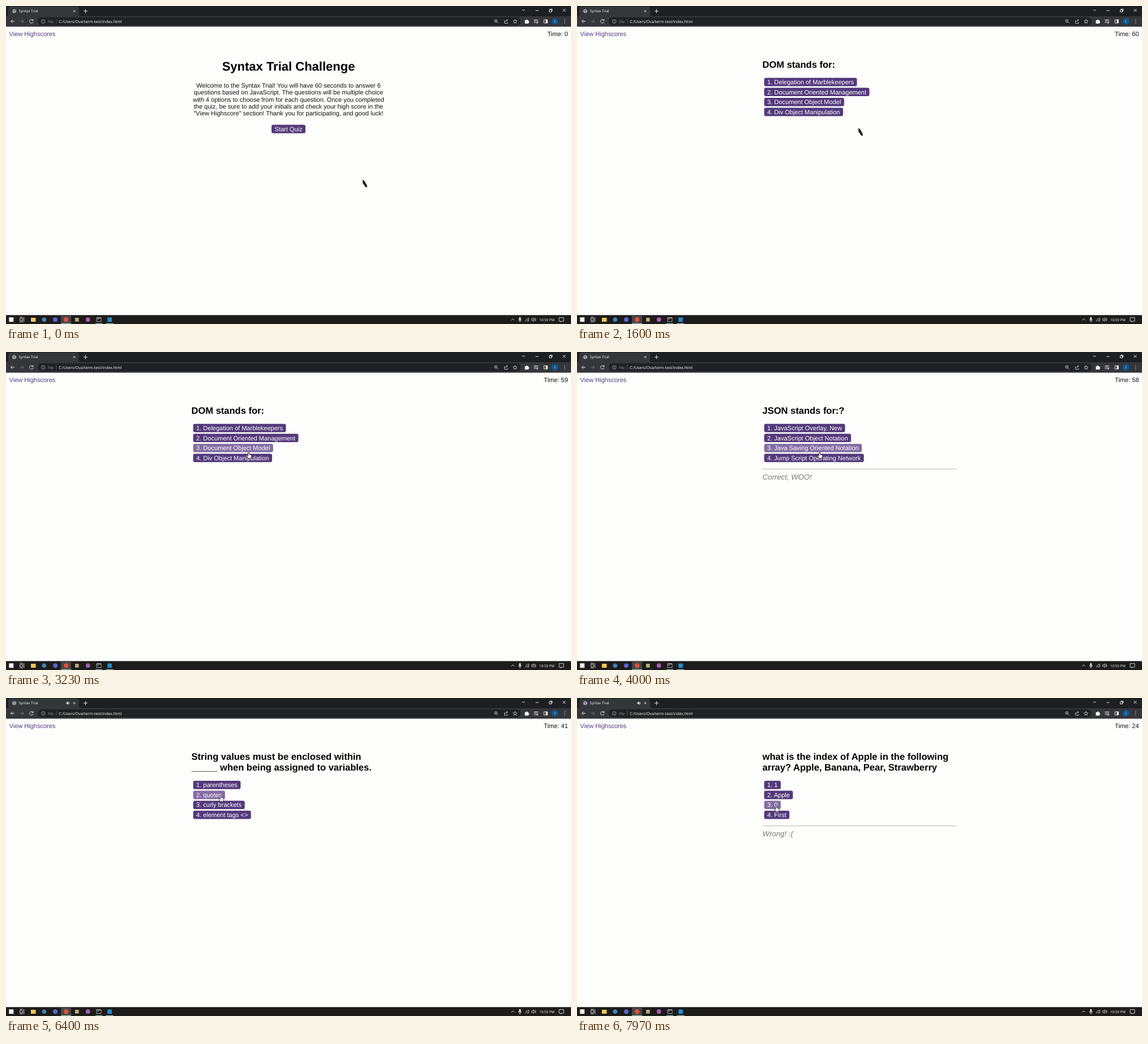
An HTML page for the animation above (8000 ms loop, 998 by 561 pixels).

```html
<!DOCTYPE html>
<html lang="en">
<head>
<meta charset="utf-8">
<title>Syntax Trial</title>
<style>
  html, body { margin: 0; width: 100%; height: 100%; overflow: hidden; background: #fdfdfc; }
  svg { display: block; width: 100%; height: 100%; }
  text { font-family: "Liberation Sans", Arial, sans-serif; font-size: 11px; fill: #111; text-rendering: geometricPrecision; white-space: pre; }
  .ui text { font-family: "Open Sans", "Noto Sans", sans-serif; font-size: 6.4px; fill: #fff; }
  .line { fill: none; stroke: #e0e2e5; stroke-width: 1; }
  .h1 { font-size: 22px; font-weight: bold; fill: #000; }
  .h2 { font-size: 16.5px; font-weight: bold; fill: #000; }
  .note { font-size: 13.2px; font-style: italic; fill: #777; }
  .mid { text-anchor: middle; }
  .end { text-anchor: end; }
  .btn rect { fill: #533a7b; }
  .btn.over rect { fill: #846da4; }
  .btn text { fill: #fff; }
</style>
</head>
<body>
<svg viewBox="0 0 998 561" preserveAspectRatio="none">
  <rect width="998" height="561" fill="#fdfdfc"/>

  <g class="ui">
    <rect width="998" height="18" fill="#1e1f22"/>
    <path d="M0 18Q4 18 4 14V5Q4 1 8 1H125Q129 1 129 5V14Q129 18 133 18Z" fill="#33373a"/>
    <rect y="18" width="998" height="18.5" fill="#35363a"/>
    <circle cx="14.6" cy="9" r="3.6" fill="#a5a9ad"/>
    <path d="M12 7.5l2.5 1 1 2-1 1.5M15 6l2 2" class="line" style="stroke:#4a4e52"/>
    <text x="22.5" y="11.2">Syntax Trial</text>
    <g id="sound">
      <path d="M106.5 7.8h1.6l2-1.8v6l-2-1.8h-1.6z" fill="#e8eaed"/>
      <path d="M111.2 7.2q1.5 1.8 0 3.6" class="line" stroke-width=".8"/>
    </g>
    <path d="M118.7 7.2l3.6 3.6m0-3.6l-3.6 3.6M137 9h7m-3.5-3.5v7" class="line"/>
    <path d="M911.8 6l2.4 2.4 2.4-2.4M935.5 8h5.2M959.7 6.7h3.8v3.8h-3.8zM961 6.5v-1.2h3.8v3.8h-1.2M983.5 5l5 5m0-5l-5 5" class="line" stroke-width=".8"/>

    <rect x="56" y="20" width="853" height="14" rx="7" fill="#202124"/>
    <path d="M15 27H8.5m3-3l-3 3 3 3" class="line"/>
    <path d="M24.5 27h6.5m-3-3l3 3-3 3" class="line" style="stroke:#77797c"/>
    <path d="M47.3 25A3.2 3.2 0 1 0 47.9 28M48 23.5v2.2h-2.5" class="line"/>
    <circle cx="65.7" cy="27.2" r="3.3" class="line" style="stroke:#aeb1b5;stroke-width:.8"/>
    <path d="M65.7 26.7v2.2m0-3.8v.8" class="line" style="stroke:#aeb1b5;stroke-width:.8"/>
    <text x="74" y="29.5" style="fill:#9aa0a6">File</text>
    <path d="M88.8 23v8" class="line" style="stroke:#5f6368;stroke-width:.8"/>
    <text x="93.3" y="29.5" style="font-size:6.9px">C:/Users/Ova/term-test/index.html</text>
    <g class="line" style="stroke:#c5c8cc;stroke-width:.9">
      <circle cx="865.2" cy="26.3" r="2.4"/>
      <path d="M867 28.2l2.3 2.3M864 26.3h2.4"/>
      <path d="M880.5 25.5v5h5.5v-2M881.8 28q.5-3 3.5-3m-1.2-1.8l2 1.8-2 1.8"/>
      <path d="M899.2 23.7l1 2.3 2.5.2-1.9 1.7.6 2.5-2.2-1.4-2.2 1.4.6-2.5-1.9-1.7 2.5-.2z"/>
    </g>
    <path d="M916.5 25h2.2a1.2 1.2 0 0 1 2.4 0h1.9v2a1.2 1.2 0 0 1 0 2.4v1.6h-6.5z" fill="#f1f3f4"/>
    <path d="M932.5 24.5h7.5M932.5 26.8h5M932.5 29.2h3.5M939 26v3.5" class="line"/>
    <circle cx="938.2" cy="29.5" r="1.2" fill="#f1f3f4"/>
    <path d="M950.2 24.2h6v5.8h-6z" class="line"/>
    <rect x="953.5" y="24" width="3" height="6" fill="#f1f3f4"/>
    <circle cx="969.6" cy="27" r="5.8" fill="#0b5c96"/>
    <text x="969.6" y="29.2" class="mid" style="font-size:6px">I</text>
    <path d="M986.8 23.3v1.4m0 1.6v1.4m0 1.6v1.4" class="line" stroke-width="1.4"/>

    <rect y="545.3" width="998" height="16" fill="#1d1c1a"/>
    <rect x="97" y="545.3" width="18" height="16" fill="#474644"/>
    <path d="M97 560.3h18M158 560.3h12M176.5 560.3h13" class="line" style="stroke:#86bfae;stroke-width:1.3"/>
    <rect x="5.3" y="549.2" width="8" height="8" fill="#f2f2f2"/>
    <path d="M24.5 551.3h5v3.8h-5zM24 549.2h6M24 557.2h6M31.7 549v8.5" class="line" style="stroke-width:.9"/>
    <rect x="44" y="550" width="8.5" height="7" fill="#f0c75a"/>
    <circle cx="67.3" cy="553.2" r="3.8" fill="#3d86bd"/>
    <circle cx="87" cy="553.2" r="4" fill="#5865d8"/>
    <circle cx="106.2" cy="553.2" r="4.2" fill="#d9503f"/>
    <rect x="122" y="550" width="6.6" height="6.6" fill="#b9ad78"/>
    <circle cx="144.7" cy="553.2" r="3.9" fill="#a85bb0"/>
    <path d="M160 550h8v6.5h-8z" fill="#0c0c0c" stroke="#d0d0d0" stroke-width=".8"/>
    <path d="M160 550.5h8M161.5 553h2.5" class="line"/>
    <rect x="179.3" y="549.5" width="7.6" height="7.6" fill="#238dd0"/>
    <path d="M892.5 554.5l2.7-2.7 2.7 2.7M905.5 552.5q0 3.5 2.3 3.5t2.3-3.5m-2.3 3.5v2" class="line" style="stroke-width:.9"/>
    <rect x="906.5" y="548.8" width="2.6" height="5.6" rx="1.3" fill="#f1f1f1"/>
    <path d="M917.5 556.5a6 6 0 0 1 6-6m-4 6a4 4 0 0 1 4-4m-2 4a2 2 0 0 1 2-2M923.3 550v6.5" class="line" style="stroke:#b8b8b6;stroke-width:.8"/>
    <path d="M928.5 551.8h1.5l2-1.8v6.5l-2-1.8h-1.5zM933.5 551.5q1.5 1.7 0 3.4m1.3-4.6q2.6 2.9 0 5.8" class="line" style="stroke-width:.8"/>
    <text x="942" y="555.5" style="font-size:6.2px">10:59 PM</text>
    <path d="M977 549.7h8v6.3h-3.2l-1.6 1.7v-1.7h-3.2z" class="line" style="stroke-width:.9"/>
  </g>

  <text x="5.6" y="52.6" style="fill:#523f80">View Highscores</text>
  <text id="time" x="992.5" y="52.6" class="end"></text>
  <g id="page"></g>
  <g id="arrow">
    <path d="M.3 0L4.8 3.8 5.3 6 7.3 8.5 8.5 12.8 7 14.2 4.5 12.2 3.3 9.7 1 7.7Z" fill="#191812"/>
    <path d="M2 3.5l1.3 2.8M4.5 8l1.5 2.6" stroke="#6b6848" stroke-width=".7"/>
  </g>
  <path id="hand" d="M-1 .8Q0-.5 1 .8V4.3L4 5Q5.2 5.3 5 6.8L4.3 11H-.7L-3.3 6.8Q-3.3 5.3-2 6L-1 7Z" fill="#fff" stroke="#222" stroke-width=".8"/>
</svg>
<script>
const LOOP = 8000;
const START = 1600, ANSWERS = [3600, 4400, 6900];
const NOTE_TIME = 1450, PENALTY = 15;
const LEFT = 327.6;

const intro = [
  'Welcome to the Syntax Trial! You will have 60 seconds to answer 6',
  'questions based on JavaScript. The questions will be multiple choice',
  'with 4 options to choose from for each question. Once you completed',
  'the quiz, be sure to add your initials and check your high score in the',
  '"View Highscore" section! Thank you for participating, and good luck!'
];

const questions = [
  { title: ['DOM stands for:'],
    options: ['Delegation of Marblekeepers', 'Document Oriented Management', 'Document Object Model', 'Div Object Manipulation'] },
  { title: ['JSON stands for:?'],
    options: ['JavaScript Overlay, New', 'JavaScript Object Notation', 'Java Saving Oriented Notation', 'Jump Script Operating Network'] },
  { title: ['String values must be enclosed within', '_____ when being assigned to variables.'],
    options: ['parentheses', 'quotes', 'curly brackets', 'element tags <>'] },
  { title: ['what is the index of Apple in the following', 'array? Apple, Banana, Pear, Strawberry'],
    options: ['1', 'Apple', '0', 'First'] }
];
const notes = ['Correct, WOO!', 'Wrong! :(', 'Wrong! :('];

// Pointer tip: [time, x, y]
const path = [
  [30, 629.5, 306], [800, 496.5, 215], [1700, 496.5, 215], [2500, 426.5, 177.6],
  [2700, 426.5, 177.6], [3000, 428.5, 176.4], [4400, 428.5, 176.4], [4600, 426.5, 177],
  [5830, 426.5, 177], [6390, 379.5, 171.5], [7600, 379.5, 171.5], [7940, 352, 189.6]
];

const $ = id => document.getElementById(id);
const page = $('page');

function add(parent, tag, attrs, label) {
  const node = document.createElementNS('http://www.w3.org/2000/svg', tag);
  for (const name in attrs) node.setAttribute(name, attrs[name]);
  if (label !== undefined) node.textContent = label;
  parent.appendChild(node);
  return node;
}

let buttons = [];

function addButton(label, x, middle, centred) {
  const g = add(page, 'g', { class: 'btn' });
  const rect = add(g, 'rect', { y: middle - 7.4, height: 14.8, rx: 3 });
  const text = add(g, 'text', { y: middle + 3.8 }, label);
  const width = text.getComputedTextLength() + 11;
  const left = centred ? x - width / 2 : x;
  rect.setAttribute('x', left);
  rect.setAttribute('width', width);
  text.setAttribute('x', left + 5.5);
  buttons.push({ g, left, right: left + width, top: middle - 7.4, bottom: middle + 7.4 });
}

function showIntro() {
  add(page, 'text', { x: 499, y: 113.8, class: 'h1 mid' }, 'Syntax Trial Challenge');
  intro.forEach((line, i) => add(page, 'text', { x: 499, y: 143.6 + i * 12.45, class: 'mid' }, line));
  addButton('Start Quiz', 499, 217, true);
}

function showQuestion({ title, options }, note) {
  const shift = (title.length - 1) * 19.3;
  title.forEach((line, i) => add(page, 'text', { x: LEFT, y: 109 + i * 19.3, class: 'h2' }, line));
  options.forEach((option, i) => addButton(`${i + 1}. ${option}`, 330.6, 134.1 + shift + i * 17.6));
  if (!note) return;
  add(page, 'rect', { x: LEFT, y: 205.8 + shift, width: 343.3, height: 1.1, fill: '#bdbdbd' });
  add(page, 'text', { x: LEFT, y: 224.6 + shift, class: 'note' }, note);
}

function pointerAt(t) {
  const next = path.findIndex(p => p[0] > t);
  if (next === 0) return path[0].slice(1);
  if (next < 0) return path[path.length - 1].slice(1);
  const [t0, x0, y0] = path[next - 1], [t1, x1, y1] = path[next];
  const u = (t - t0) / (t1 - t0), k = u * u * (3 - 2 * u);
  return [x0 + (x1 - x0) * k, y0 + (y1 - y0) * k];
}

function timeLeft(t) {
  if (t < START) return 0;
  const wrong = ANSWERS.filter((at, i) => t >= at && notes[i].startsWith('Wrong')).length;
  return 60 - Math.floor((t - START) / 1000) - wrong * PENALTY;
}

let shown = '';

function draw(t) {
  const answered = ANSWERS.filter(at => t >= at).length;
  const noted = answered > 0 && t < ANSWERS[answered - 1] + NOTE_TIME;
  const key = t < START ? 'intro' : `${answered} ${noted}`;
  if (key !== shown) {
    shown = key;
    buttons = [];
    page.replaceChildren();
    if (t < START) showIntro();
    else showQuestion(questions[answered], noted && notes[answered - 1]);
  }

  const [x, y] = pointerAt(t);
  let over = false;
  for (const b of buttons) {
    const hit = x >= b.left && x <= b.right && y >= b.top && y <= b.bottom;
    b.g.classList.toggle('over', hit);
    over = over || hit;
  }
  for (const id of ['arrow', 'hand']) {
    $(id).setAttribute('transform', `translate(${x} ${y})`);
    $(id).setAttribute('visibility', (id === 'hand') === over ? 'visible' : 'hidden');
  }
  $('time').textContent = `Time: ${timeLeft(t)}`;
  $('sound').setAttribute('visibility', t >= ANSWERS[1] ? 'visible' : 'hidden');
}

function frame() {
  draw(performance.now() % LOOP);
  requestAnimationFrame(frame);
}
frame();
</script>
</body>
</html>
```
